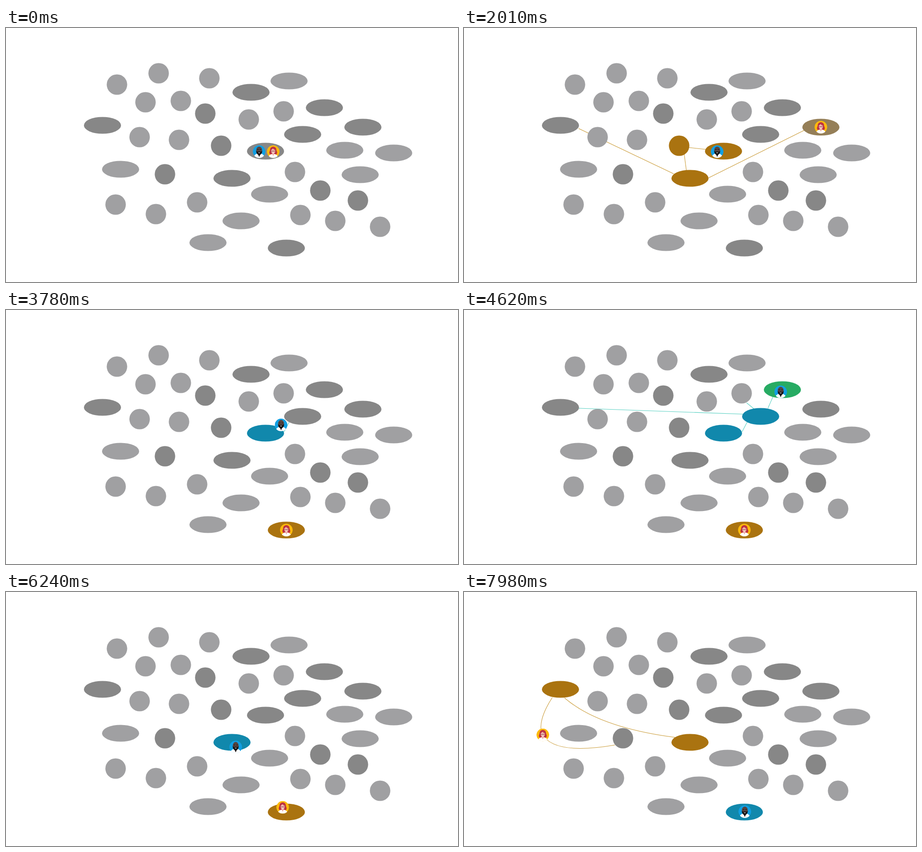
An HTML page for the animation above (8 s loop, 998 by 561 pixels).

```html
<!DOCTYPE html>
<html lang="en">
<head>
<meta charset="utf-8">
<title>Two travellers in a network</title>
<style>
  html, body { margin: 0; width: 100%; height: 100%; overflow: hidden; background: #fff; }
  svg { display: block; width: 100%; height: 100%; }
</style>
</head>
<body>
<svg id="stage" viewBox="0 0 998 561">
  <defs><clipPath id="disc"><circle r="14"/></clipPath></defs>
  <g id="links" fill="none" stroke-width="1.1"></g>
  <g id="nodes"></g>
  <g id="woman" clip-path="url(#disc)">
    <circle r="14" fill="#fdb90c"/>
    <path d="M-7-4C-7-13 7-13 7-4C7-1 10 1 8 5C4 9-4 9-8 5C-10 1-7-1-7-4Z" fill="#bd2f3f"/>
    <path d="M-11 14C-10 7-5 6-2 5H2C5 6 10 7 11 14Z" fill="#fff"/>
    <path d="M-2 3H2V6L0 10L-2 6Z" fill="#eeb0a6"/>
    <ellipse cy="-1.5" rx="4.8" ry="6" fill="#f2bdb2"/>
    <path d="M-5-4C-4-9 3-9 5-3C2-4 0-6-1-7C-2-5-3-4-5-4Z" fill="#bd2f3f"/>
    <path d="M-4.5-2H-1V0H-4.5ZM1-2H4.5V0H1ZM-1-1.5H1" fill="none" stroke="#9a4b55" stroke-width=".7"/>
    <path d="M-2 2.2Q0 3.8 2 2.2Z" fill="#fff"/>
  </g>
  <g id="man" clip-path="url(#disc)">
    <circle r="14" fill="#109fe3"/>
    <path d="M-12 14C-11 6-6 5-3 4H3C6 5 11 6 12 14Z" fill="#fff"/>
    <path d="M-4 3H4L0 12Z" fill="#211b1b"/>
    <ellipse cy="-3" rx="6.5" ry="8" fill="#54433f"/>
    <path d="M-6.5-2Q-4 1-2 0H2Q4 1 6.5-2C7 4 3 7.5 0 7.5C-3 7.5-7 4-6.5-2Z" fill="#171414"/>
    <path d="M-4.5-4.5H-1.5M1.5-4.5H4.5" stroke="#171414"/>
    <path d="M-2.5 2H2.5Q0 4.5-2.5 2Z" fill="#fff"/>
  </g>
</svg>
<script>
const LOOP = 8000, FADE = 130;
const LIGHT = [160, 160, 162], DARK = [135, 135, 135];
const GOLD = [170, 115, 16], BLUE = [17, 136, 172], GREEN = [39, 171, 99];
const GOLD_LINE = '#c99a35', TEAL_LINE = '#55cfc1';

const lightCircles = [[245,125], [337,100], [449,111], [308,164], [386,161], [295,241], [382,247],
  [536,202], [613,184], [638,318], [242,390], [331,411], [422,385], [650,413], [727,426], [826,439]];
const lightEllipses = [[625,117], [748,270], [856,276], [782,324], [253,312], [582,367], [519,426], [446,474]];

// Hubs: centre, shape, then the colours they fade to and when.
const hubs = [
  [440, 189, 'circle'], [694, 359, 'circle'], [777, 381, 'circle'],
  [475, 260, 'circle', [1000, GOLD], [3300, DARK]],
  [351, 323, 'circle', [5560, BLUE], [5950, DARK]],
  [541, 142, 'ellipse', [5230, BLUE], [5950, DARK]],
  [213, 215, 'ellipse', [7490, GOLD]],
  [573, 272, 'ellipse', [600, GOLD], [3450, BLUE], [5900, DARK]],
  [655, 235, 'ellipse', [3900, BLUE], [5900, DARK]],
  [703, 176, 'ellipse', [4470, GREEN], [5900, DARK]],
  [788, 219, 'ellipse', [1960, GOLD], [3300, DARK]],
  [499, 332, 'ellipse', [1440, GOLD], [3300, DARK], [5930, BLUE], [6540, GOLD]],
  [619, 486, 'ellipse', [3300, GOLD], [6540, BLUE]],
];

// Links: path, colour, time of appearing, time of leaving.
const links = [
  ['M497 264L533 268', GOLD_LINE, 650, 3420],
  ['M614 269L625 248', GOLD_LINE, 650, 1000],
  ['M452 207L473 238', GOLD_LINE, 940, 1480],
  ['M486 277L491 315', GOLD_LINE, 940, 3420],
  ['M540 331L751 226', GOLD_LINE, 1500, 3420],
  ['M253 222L463 322', GOLD_LINE, 1500, 2060],
  ['M797 238C789 285 804 294 825 295C850 296 859 306 849 330C835 362 795 420 770 455C740 498 700 512 651 498',
    GOLD_LINE, 2120, 3420],
  ['M614 269L625 248', TEAL_LINE, 3540, 5900],
  ['M616 230L254 217', TEAL_LINE, 3980, 4700],
  ['M640 218L624 205', TEAL_LINE, 3980, 4700],
  ['M671 217L682 192', TEAL_LINE, 3980, 5900],
  ['M664 170L582 145', TEAL_LINE, 4760, 5900],
  ['M505 150C380 165 200 250 332 313', TEAL_LINE, 5260, 5900],
  ['M374 324L460 329', TEAL_LINE, 5620, 5960],
  ['M222 234C270 275 350 306 466 321', GOLD_LINE, 6900, LOOP * 2],
  ['M195 233C176 262 160 300 177 320C196 344 245 353 333 338', GOLD_LINE, 7810, LOOP * 2],
];

// Routes: start time, end time, path travelled at constant speed.
const routes = {
  woman: [
    [840, 1060, 'M590 273L475 260'],
    [1205, 1450, 'M475 260L499 332'],
    [1640, 2010, 'M499 332L788 219'],
    [2610, 3370, 'M788 219C776 262 776 283 783 296C795 303 835 300 815 345C790 390 760 440 735 468C712 492 660 505 619 486'],
    [6210, 6670, 'M619 486L499 332'],
    [7230, 7620, 'M499 332C350 306 265 275 213 215'],
    [7825, 8240, 'M213 215C178 258 160 300 177 320C196 344 260 353 351 323'],
  ],
  man: [
    [3640, 3920, 'M559 273L655 235'],
    [4400, 4640, 'M655 235L703 176'],
    [5040, 5260, 'M703 176L541 142'],
    [5320, 5600, 'M541 142C380 165 200 250 351 323'],
    [5700, 5960, 'M351 323L499 332'],
    [6210, 6670, 'M499 332L620 485'],
  ],
};

const byId = id => document.getElementById(id);
const clamp = x => Math.min(1, Math.max(0, x));

function make(tag, attributes, parent) {
  const element = document.createElementNS('http://www.w3.org/2000/svg', tag);
  for (const name in attributes) element.setAttribute(name, attributes[name]);
  if (parent) parent.append(element);
  return element;
}

function addNode(x, y, shape, color) {
  const [rx, ry] = shape === 'circle' ? [22.6, 22.6] : [41, 18.6];
  return make('ellipse', { cx: x, cy: y, rx, ry, fill: `rgb(${color})` }, byId('nodes'));
}

lightCircles.forEach(([x, y]) => addNode(x, y, 'circle', LIGHT));
lightEllipses.forEach(([x, y]) => addNode(x, y, 'ellipse', LIGHT));
const hubViews = hubs.map(([x, y, shape, ...fades]) => ({ element: addNode(x, y, shape, DARK), fades }));
const linkViews = links.map(([d, stroke, from, to]) =>
  ({ element: make('path', { d, stroke }, byId('links')), from, to }));
const travellers = Object.entries(routes).map(([id, legs]) => ({
  element: byId(id),
  legs: legs.map(([start, end, d]) => {
    const path = make('path', { d });
    return { start, end, path, length: path.getTotalLength() };
  }),
}));

function colorAt(fades, t) {
  return fades.reduce((color, [start, next]) => {
    const k = clamp((t - start) / FADE);
    return color.map((c, i) => c + (next[i] - c) * k);
  }, DARK);
}

function placeAt(legs, t) {
  const leg = legs.filter(l => l.start <= t).pop() || legs[0];
  return leg.path.getPointAtLength(leg.length * clamp((t - leg.start) / (leg.end - leg.start)));
}

function draw(t) {
  for (const { element, fades } of hubViews)
    element.setAttribute('fill', `rgb(${colorAt(fades, t).map(Math.round)})`);
  for (const { element, from, to } of linkViews)
    element.setAttribute('opacity', clamp((t - from) / FADE) * clamp(1 - (t - to) / FADE));
  for (const { element, legs } of travellers) {
    const { x, y } = placeAt(legs, t);
    element.setAttribute('transform', `translate(${x} ${y})`);
  }
}

const began = performance.now();
function tick() {
  draw((performance.now() - began) % LOOP);
  requestAnimationFrame(tick);
}
tick();
</script>
</body>
</html>
```
